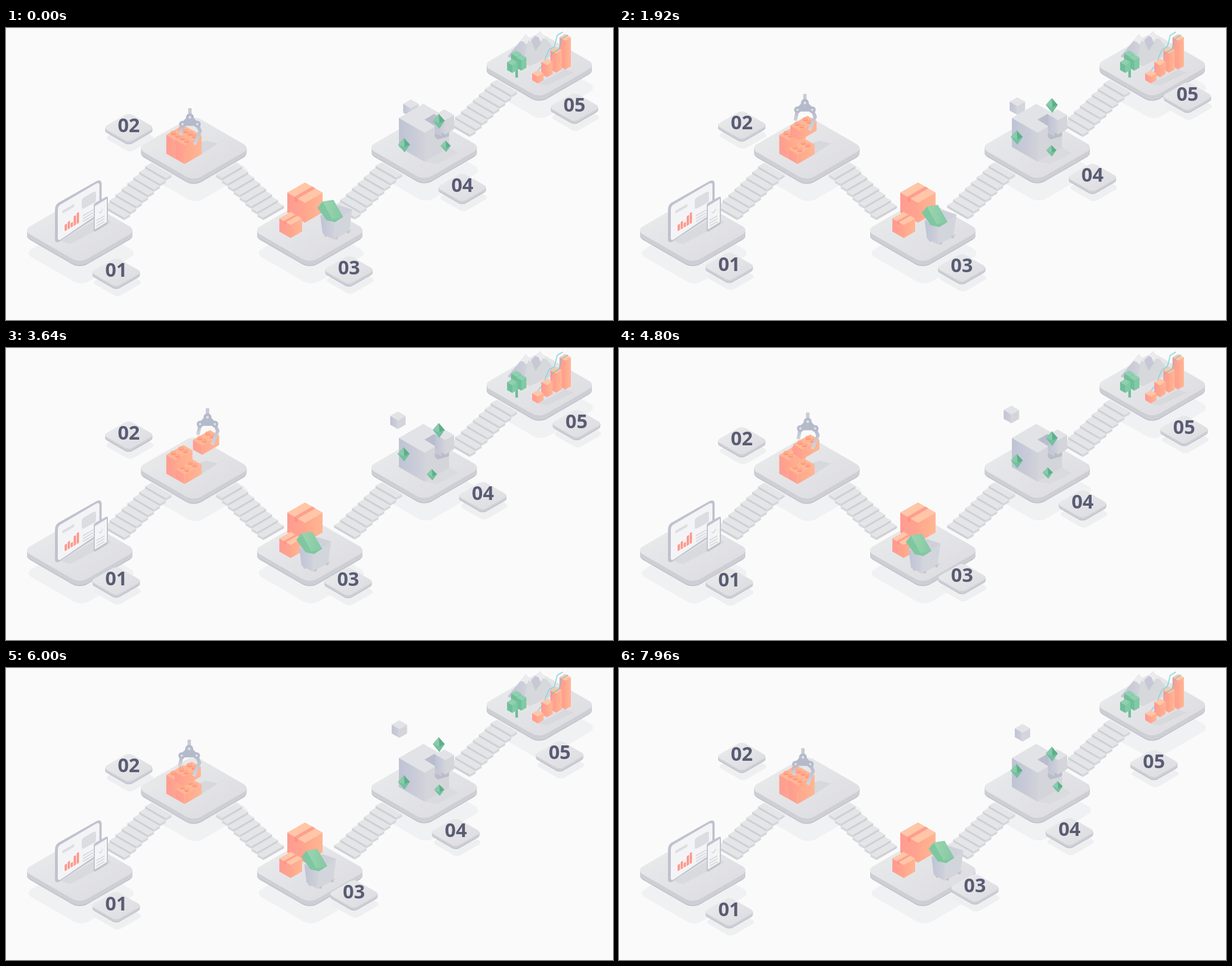
These frames come from a looping animation (1066x513 px, 8000 ms). An HTML page:

```html
<!DOCTYPE html>
<html lang="en">
<head>
<meta charset="utf-8">
<title>Five steps</title>
<style>
html, body { margin: 0; width: 100%; height: 100%; overflow: hidden; background: #fafafa; }
svg { display: block; width: 1066px; height: 513px; }
text { font: 700 34px "Open Sans", "Noto Sans", sans-serif; fill: #5a5c74; text-anchor: middle; }
</style>
</head>
<body>
<svg id="stage" viewBox="0 0 1066 513"></svg>
<script>
const K = 0.577; // isometric slope
const ORANGE = ['#ffc6a8', 'url(#red)', 'url(#orange)'];
const GREY = ['#e2e3e6', 'url(#blue)', '#d4d5da'];
const GREEN = ['#8fd0ae', '#70be9b', '#80c9a6'];

const grad = (id, from, to, x2 = 1, y2 = 0) =>
  `<linearGradient id="${id}" x2="${x2}" y2="${y2}"><stop stop-color="${from}"/><stop offset="1" stop-color="${to}"/></linearGradient>`;
const poly = (points, fill, extra = '') => `<polygon points="${points}" fill="${fill}" ${extra}/>`;
const line = (points, color, width) =>
  `<polyline points="${points}" fill="none" stroke="${color}" stroke-width="${width}" stroke-linejoin="round"/>`;
const rect = (x, y, w, h, fill) => `<rect x="${x}" y="${y}" width="${w}" height="${h}" fill="${fill}"/>`;
const path = (d, fill) => `<path d="${d}" fill="${fill}"/>`;
const circle = (x, y, r, fill) => `<circle cx="${x}" cy="${y}" r="${r}" fill="${fill}"/>`;
const group = (id, body) => `<g id="${id}">${body}</g>`;
const repeat = (n, draw) => Array.from({ length: n }, (_, i) => draw(i)).join('');

// Box given by its front top corner, right and left extents, and height.
function box(x, y, a, b, h, [top, left, right]) {
  const R = [x + a, y - a * K], L = [x - b, y - b * K];
  return poly([[x, y], R, [x + a - b, y - (a + b) * K], L], top) +
    poly([[x, y], L, [L[0], L[1] + h], [x, y + h]], left) +
    poly([[x, y], R, [R[0], R[1] + h], [x, y + h]], right);
}

// Rounded isometric square.
function tile(x, y, half, r, fill) {
  const s = (half + 0.414 * r) / 1.414;
  return `<rect x="${-s}" y="${-s}" width="${2 * s}" height="${2 * s}" rx="${r}" fill="${fill}" transform="matrix(.707 .408 -.707 .408 ${x} ${y})"/>`;
}

function slab(x, y, half, r, h) {
  const layer = (depth, fill) => tile(x, y + depth, half, r, fill) + rect(x - half, y, 2 * half, depth, fill);
  return layer(h + 1.3, '#bcbdc7') + layer(h, '#cecfd5') + tile(x, y, half, r, 'url(#top)');
}

const PADS = [[129.5, 355.5], [329.8, 211], [533.5, 355.5], [734.5, 210], [936.5, 65]];
const padShadow = ([x, y]) => tile(x + 2.5, y + 40, 92, 18, '#f0f1f2');
const pad = ([x, y]) => slab(x, y, 92.5, 18, 8);

// Steps leave the pad downwards; side -1 runs left, 1 runs right.
function stairs([px, py], side) {
  return repeat(8, i => {
    const at = (u, v) => [px + side * (75 + 10.4 * i + u), py + 26 + 9.9 * i + v];
    const back = at(0, 0), far = at(-36, 20.8), near = at(-25.6, 26.8), front = at(10.4, 6);
    const low = ([x, y]) => [x, y + 4.5];
    return poly([back, far, near, front], '#e4e5e7') +
      poly([front, near, low(near), low(front)], '#cfd0d6') +
      poly([far, near, low(near), low(far)], '#d6d7dc');
  });
}

function devices() {
  const rule = (x, y, w) => line([[x, y], [x + w, y - w * K]], '#d3d4d8', 1.5);
  const bar = i => {
    const x = 103 + 5.3 * i, y = 357 - 3.1 * i, h = 11 + 2 * i - (i === 2 ? 7 : 0);
    return poly([[x, y], [x + 4, y - 2.3], [x + 4, y - 2.3 - h], [x, y - h]], '#ff988b');
  };
  return poly('96,374 168,331 186,341 112,380', '#d9dadd') +
    path('M86 319Q86 311 92 307L159 269Q167 265 168 273V326L94 375Q86 379 86 371Z', '#c0c3ce') +
    path('M91 319Q91 313 96 310L159 273Q164 271 164 276V325L97 371Q91 375 91 369Z', '#f4f4f6') +
    poly('99,321 120,309 120,314 99,326', '#dddee1') +
    path('M133 303Q133 300 136 298L154 288Q158 286 158 290V302Q158 305 155 307L137 317Q133 319 133 315Z', '#dcdde1') +
    repeat(5, bar) + repeat(3, i => rule(135, 330 + 5 * i, 18)) +
    path('M154 313Q154 309 157 307L175 297Q179 295 179 299V341Q179 344 176 346L158 357Q154 359 154 355Z', '#c0c3ce') +
    path('M156 313L177 300V341L156 354Z', '#f4f4f6') +
    line('163,323 166,325 170,318', '#d5d6da', 1.5) + repeat(3, i => rule(159, 338 + 5 * i, 14));
}

function brick(x, y) {
  const stud = i => {
    const u = i < 2 ? 22 : 8, v = i % 2 ? 4 : 12;
    const sx = x + u - v, sy = y - (u + v) * K;
    return `<ellipse cx="${sx}" cy="${sy}" rx="4.4" ry="2.8" fill="#ff927f"/>` +
      `<ellipse cx="${sx}" cy="${sy - 2}" rx="4.4" ry="2.6" fill="#ffa98c"/>`;
  };
  return box(x, y, 30, 16, 17, ['#ffb793', 'url(#red)', 'url(#orange)']) + repeat(4, stud);
}

const joint = (x, y, r) => circle(x, y, r, '#b5bacb') + circle(x, y, r * 0.35, '#dfe1e7');
const claw = rect(320, 141, 6, 13, '#c9cbd5') +
  line('310,170 306,188', 'url(#arm)', 6) + line('336,170 341,181 331,205', 'url(#arm)', 6) +
  line('323,157 312,168 334,168 323,157', '#b5bacb', 8) +
  joint(323, 157, 7) + joint(310, 169, 6) + joint(336, 169, 6);

const cart =
  poly('556,362 575,372 608,355 585,345', '#d5d6da') +
  circle(562, 364, 2.8, '#c4c6cf') + circle(580, 369, 2.8, '#c4c6cf') + circle(601, 358, 2.8, '#c4c6cf') +
  poly('552,329 584,311 608,319 577,343', '#cfd1da') +
  poly('552,329 577,343 575,371 556,361', 'url(#blue)') +
  poly('577,343 608,318 603,355 575,371', '#d3d5dc') +
  poly('547,316 556,305 575,302 592,332 578,341 563,338', '#7fc7a1') +
  poly('556,305 575,302 592,332 573,336', 'url(#leaf)');

// Taped cube-shaped parcel.
function parcel(x, y, s, h) {
  const m = s / 2, w = s * 0.09;
  const edge = d => [x - m + d, y - (m - d) * K];
  const far = ([ex, ey]) => [ex + s, ey - s * K], down = ([ex, ey]) => [ex, ey + h * 0.2];
  const p = edge(-w), q = edge(w);
  return box(x, y, s, s, h, ORANGE) + poly([p, q, far(q), far(p)], '#ff9f8c') +
    poly([p, q, down(q), down(p)], '#ff8f86');
}

const bigCube =
  poly('735,235 778,209 795,220 757,239', '#dadbdf') +
  box(735, 184, 43, 45, 51, GREY) +
  poly('735,161 752,151 779,167 778,190 758,196 753,191 753,172', '#b9bdcb') +
  poly('753,172 765,165 765,190 753,185', '#c6c9d4') +
  box(771, 162, 16, 17, 25, GREY);

const gem = (w, h) =>
  poly([[0, -h], [w, -1], [1, h], [-w, -1]], '#74c09f') +
  poly([[0, -h], [w, -1], [1, 3]], '#5fae8c') +
  poly([[0, -h], [-w, -1], [1, 3]], '#88cbaa');

const chart = i => box(982 - 16 * i, 22 + 23 * i - i * i * 0.6, 10, 10, 51 - 19 * i + 2 * i * i, ORANGE);

const summit =
  poly('881,50 913,11 922,21 938,6 961,34 960,48 920,67', '#d7d8dc') +
  poly('881,50 913,11 915,30 909,60', 'url(#blue)') +
  poly('922,22 938,6 940,26 930,40', '#c6c9d5') +
  poly('903,23 913,11 924,24 918,22 914,29 909,24', '#ececef') +
  poly('930,14 938,6 949,20 943,18 939,25 935,16', '#ececef') +
  rect(894.5, 68, 4.5, 19, '#6dbd98') +
  box(896, 50, 9, 9, 14, GREEN) + box(905, 57, 9, 9, 18, GREEN) + box(889, 65, 9, 9, 14, GREEN) +
  poly('934,98 966,82 981,73 998,78 950,101', '#d8d9dd') +
  line('934,75 945,62 948,51 954,38 963,33 968,13 978,7', '#7fd5e0', 1.6) +
  repeat(4, chart) +
  line('958,46 964,41 971,38 975,20 987,12', '#6fcdda', 1.4);

const label = n => group('label' + n,
  tile(2.5, 22, 41, 9, '#eeeff0') + slab(0.3, 4, 41.5, 9, 4) + `<text x="0.3" y="12">0${n}</text>`);

stage.innerHTML = '<defs>' +
  grad('top', '#e7e8ea', '#dfdfe3') + grad('blue', '#bec3d5', '#d0d2da') +
  grad('red', '#ff9b92', '#ffa48e') + grad('orange', '#ffa78c', '#ffb694') +
  grad('leaf', '#9ad6b0', '#84c8a3') + grad('arm', '#b5bacb', '#d3d5dd', 0, 1) + '</defs>' +
  PADS.map(padShadow).join('') +
  stairs(PADS[1], -1) + stairs(PADS[1], 1) + stairs(PADS[3], -1) + stairs(PADS[4], -1) +
  PADS.map(pad).join('') + devices() +
  poly('314,239 343,222 372,203 352,198 330,205', '#d7d8dc') +
  brick(297.5, 213) + brick(313.5, 222) + brick(297.5, 197) +
  group('crane', brick(313.5, 206) + claw) +
  parcel(525, 307, 31, 35) + parcel(500, 346, 20, 23) + group('cart', cart) +
  group('cube', box(0, 0, 13.5, 13.5, 15.5, GREY)) + bigCube +
  group('gem1', gem(10.5, 13)) + group('gem2', gem(10.5, 12.5)) + group('gem3', gem(9, 10)) +
  summit + repeat(5, i => label(i + 1));

const mix = (a, b, s) => [a[0] + (b[0] - a[0]) * s, a[1] + (b[1] - a[1]) * s];

// Back and forth at constant speed, after a delay; times in seconds.
const yoyo = (from, to, half, delay = 0) => t => {
  const s = Math.max(t - delay, 0) / half % 2;
  return mix(from, to, 1 - Math.abs(1 - s));
};

// Straight legs between stops of [time, x, y].
const route = (...stops) => t => {
  const i = stops.findIndex(stop => stop[0] > t);
  if (i < 0) return stops.at(-1).slice(1);
  const [t0, ...a] = stops[i - 1], [t1, ...b] = stops[i];
  return mix(a, b, (t - t0) / (t1 - t0));
};

const MOTION = {
  label1: yoyo([193.3, 425], [193.3, 403], 4.05),
  label2: yoyo([215.3, 171], [215.3, 148], 2.27, 1.46),
  label3: route([0, 602, 421], [1.3, 602, 421], [4.5, 600, 401], [8, 625, 382]),
  label4: route([0, 801, 276], [3.05, 849, 248], [6.43, 781, 290], [8, 791, 283]),
  label5: route([0, 998, 135], [2.15, 998, 113.5], [4.15, 1003, 134], [8, 938.5, 164]),
  crane: route([0, 0, 0], [1.73, 0, -24], [3.53, 33, -36], [5.34, -2, -24], [7.1, 0, 0]),
  cart: yoyo([0, 0], [-47.5, 27], 3.75, 0.72),
  cube: route([0, 711, 141], [1.4, 704, 140], [3.3, 688, 130], [5.9, 690, 107], [8, 709, 114]),
  gem1: yoyo([760, 164], [760, 123], 2, 0.57),
  gem2: yoyo([699, 206], [698, 181], 2.46, 0.6),
  gem3: yoyo([772, 208], [746.5, 223.5], 3.85)
};
const parts = Object.entries(MOTION).map(([id, place]) => [document.getElementById(id), place]);

function frame() {
  const t = Math.floor(performance.now() % 8000 / 40) * 0.04;
  for (const [part, place] of parts) part.setAttribute('transform', `translate(${place(t)})`);
  requestAnimationFrame(frame);
}
frame();
</script>
</body>
</html>
```
